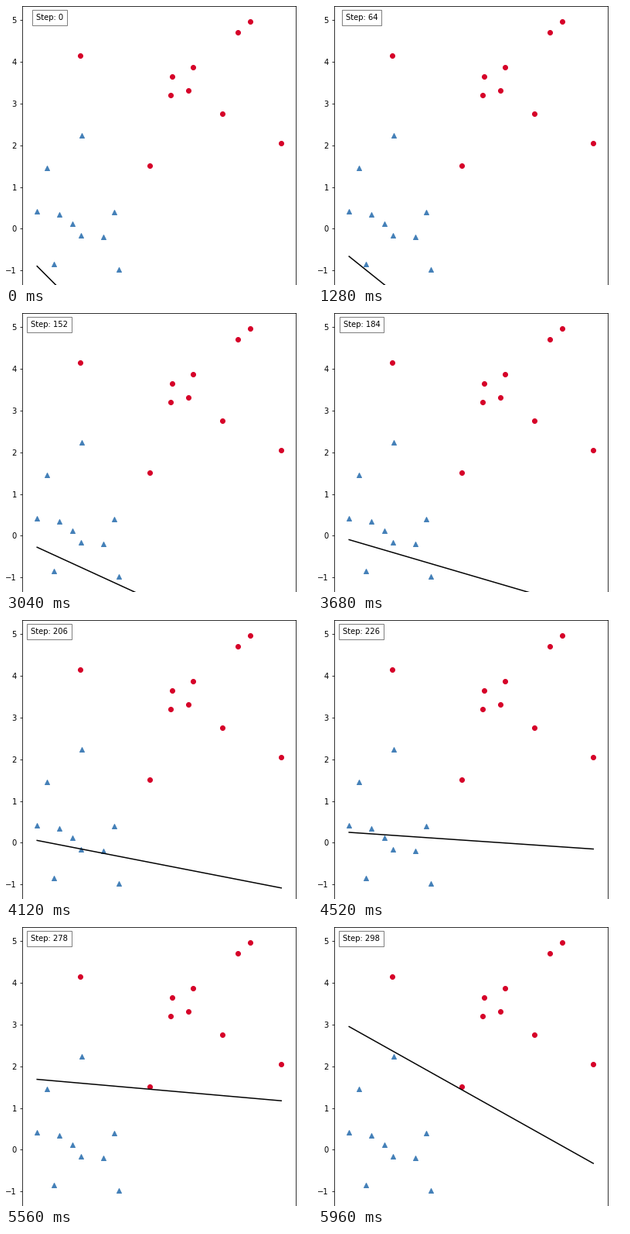
Write a matplotlib script that moves like this. It is 396 by 360 pixels and loops after 6 s.

```python
import numpy as np
import matplotlib.pyplot as plt
from matplotlib.animation import FuncAnimation

W, H, DPI = 396, 360, 72
FRAMES, INTERVAL = 150, 40
STEPS_PER_FRAME = 2

plt.rcParams["font.family"] = "DejaVu Sans"
plt.rcParams["font.size"] = 10

# Stage coordinates in pixels, y downwards
RED = [(96, 64), (215, 91), (213, 115), (236, 109), (242, 79),
       (186, 206), (280, 139), (300, 34), (316, 20), (356, 177)]
BLUE = [(40, 265), (53, 209), (69, 269), (62, 333), (86, 281),
        (97, 296), (98, 167), (126, 298), (140, 266), (146, 340)]
LEFT, RIGHT, DEPTH = 21, 375, 400
ZERO_Y, UNIT = 287.4, 53.85
ENDS = [40.2, 356.2]

# Stages of training: step, vertical weight, boundary height at both ends
STEPS, WEIGHT, Y_LEFT, Y_RIGHT = np.transpose([
    (0, 1.00, 335.7, 651.7),
    (116, 0.84, 310.9, 502),
    (184, 0.665, 292.5, 384.8),
    (226, 0.47, 274, 295.5),
    (256, 0.25, 235.5, 178),
    (298, 0.13, 128.5, 305),
])


def boundary(step):
    """Constant gradients move the weights linearly; the line is their ratio."""
    w = np.interp(step, STEPS, WEIGHT)
    return [np.interp(step, STEPS, WEIGHT * y) / w for y in (Y_LEFT, Y_RIGHT)]


fig = plt.figure(figsize=(W / DPI, H / DPI), dpi=DPI, facecolor="white")

# The plot runs off the bottom of the stage
ax = fig.add_axes([LEFT / W, (H - DEPTH) / H, (RIGHT - LEFT) / W, DEPTH / H])
ax.set_xlim(LEFT, RIGHT)
ax.set_ylim(DEPTH, 0)
ax.set_xticks([])
values = range(-1, 6)
ax.set_yticks([ZERO_Y - UNIT * v for v in values],
              [str(v).replace("-", "\u2212") for v in values])

for points, color, marker in ((RED, "#d60029", "o"), (BLUE, "#4480b8", "^")):
    ax.scatter(*zip(*points), s=36, c=color, marker=marker)
line, = ax.plot([], [], color="black", lw=1.5)
label = ax.text(LEFT + 0.1 * (RIGHT - LEFT), 18.2, "", ha="center",
                bbox=dict(facecolor="white", alpha=0.5, pad=5))


def update(i):
    step = i * STEPS_PER_FRAME
    line.set_data(ENDS, boundary(step))
    label.set_text(f"Step: {step}")
    return line, label


anim = FuncAnimation(fig, update, frames=FRAMES, interval=INTERVAL,
                     repeat=True, repeat_delay=0)
plt.show()
```
